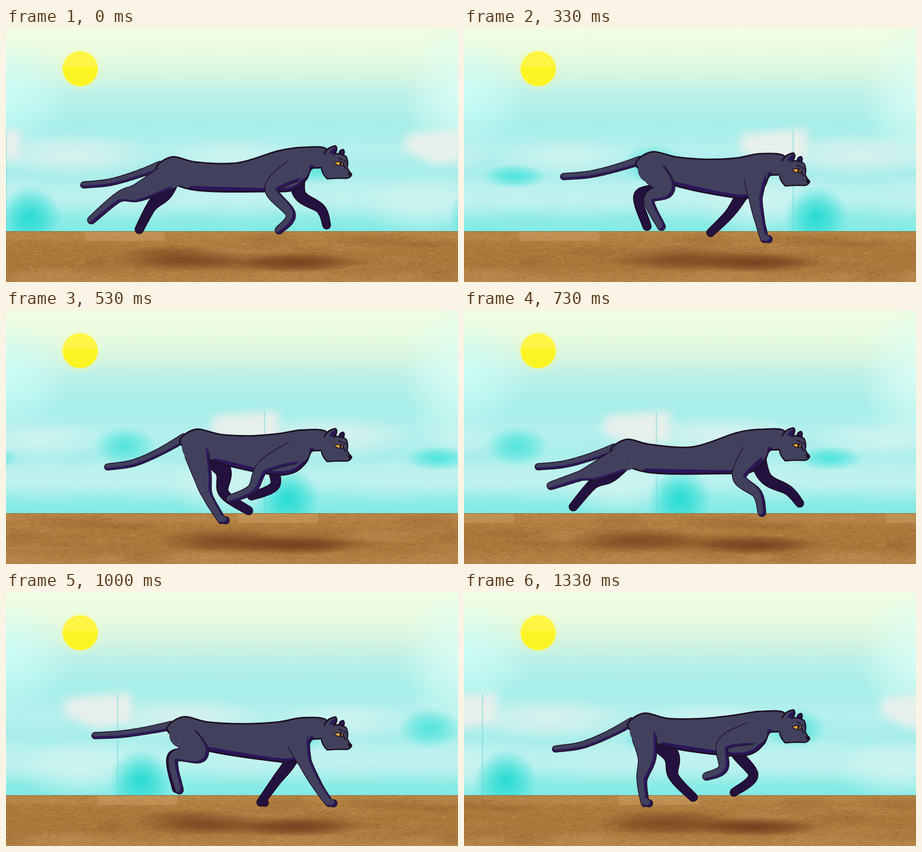
Write an HTML page with a canvas that moves like this. It is 889 by 500 pixels and loops after 1.39 s.

```html
<!DOCTYPE html>
<html lang="en">
<head>
<meta charset="utf-8">
<title>Running panther</title>
<style>
  html, body { margin: 0; width: 100%; height: 100%; overflow: hidden; background: #bdf0ec; }
  canvas { display: block; width: 889px; height: 500px; }
</style>
</head>
<body>
<canvas id="stage" width="889" height="500"></canvas>
<script>
const W = 889, H = 500, HORIZON = 400, LOOP = 1390, FRAMES = 21, STRIDE = 10.5;
const INK = '#1d1022', COAT = '#41415e', SHADE = '#2b1659', FAR = '#23113f';
const ctx = document.getElementById('stage').getContext('2d');

// Key poses of the near side. hind: knee, hock, paw; fore: elbow, wrist, paw.
// The far legs repeat the near ones, late by `lag` behind and early by `lead` in front.
const poses = [
  { at: 0, lag: 0.5, lead: 1.4, rump: [325, 254],
    hind: [262, 323, 222, 333, 168, 378], fore: [522, 316, 560, 367, 537, 398] },
  { at: 0.5, lag: 0.75, lead: 1.5, rump: [318, 255],
    hind: [262, 316, 230, 326, 171, 346], fore: [541, 328, 577, 362, 586, 399] },
  { at: 3, lag: 0, lead: 1.7, rump: [350, 246],
    hind: [367, 328, 307, 314, 297, 366], fore: [604, 338, 655, 357, 710, 368] },
  { at: 4.5, lag: 0.2, lead: 1.5, rump: [347, 246],
    hind: [380, 318, 330, 326, 341, 390], fore: [588, 335, 615, 385, 636, 415] },
  { at: 6, lag: 0.5, lead: 1.6, rump: [410, 240],
    hind: [430, 312, 432, 360, 483, 393], fore: [545, 338, 517, 376, 501, 414] },
  { at: 8, lag: 1.8, lead: 1.6, rump: [372, 235],
    hind: [386, 325, 396, 365, 424, 413], fore: [507, 308, 484, 352, 441, 372] },
  { at: 9.5, lag: 2.4, lead: 0.9, rump: [352, 239],
    hind: [360, 325, 350, 370, 356, 415], fore: [511, 298, 510, 347, 477, 363] }
];
poses.push({ ...poses[0], at: STRIDE });

const mix = (a, b, k) => a + (b - a) * k;
const clamp = (v, lo, hi) => Math.min(hi, Math.max(lo, v));
const wrap = (v, n) => ((v % n) + n) % n;

function poseAt(phase) {
  phase = wrap(phase, STRIDE);
  const i = poses.findIndex(p => p.at > phase);
  const a = poses[i - 1], b = poses[i], k = (phase - a.at) / (b.at - a.at), out = {};
  for (const key in a) {
    out[key] = Array.isArray(a[key])
      ? a[key].map((v, n) => mix(v, b[key][n], k))
      : mix(a[key], b[key], k);
  }
  return out;
}

// Bezier handles of a smooth curve, one [start, c1, c2, end] per span
function spans(pts, closed) {
  const n = pts.length;
  const at = i => pts[closed ? wrap(i, n) : clamp(i, 0, n - 1)];
  const list = [];
  for (let i = 0; i < n - (closed ? 0 : 1); i++) {
    const [a, b, c, d] = [at(i - 1), at(i), at(i + 1), at(i + 2)];
    list.push([b, b.map((v, k) => v + (c[k] - a[k]) / 6), c.map((v, k) => v - (d[k] - b[k]) / 6), c]);
  }
  return list;
}

function curve(pts, closed) {
  const path = new Path2D();
  path.moveTo(...pts[0]);
  for (const [, p, q, end] of spans(pts, closed)) path.bezierCurveTo(...p, ...q, ...end);
  return path;
}

// Discs along a smooth curve; together they form a tapering limb
function discs(pts, radii) {
  const list = [], steps = 18;
  spans(pts).forEach((s, i) => {
    for (let n = 0; n <= steps; n++) {
      const t = n / steps, u = 1 - t;
      const [x, y] = [0, 1].map(k =>
        u * u * u * s[0][k] + 3 * u * u * t * s[1][k] + 3 * u * t * t * s[2][k] + t * t * t * s[3][k]);
      list.push({ x, y, r: mix(radii[i], radii[i + 1], t) });
    }
  });
  return list;
}

function union(list, grow = 0) {
  const path = new Path2D();
  for (const { x, y, r } of list) {
    path.moveTo(x + r + grow, y);
    path.arc(x, y, r + grow, 0, 7);
  }
  return path;
}

function fill(path, color) {
  ctx.fillStyle = color;
  ctx.fill(path);
}

function line(path, color, width) {
  ctx.strokeStyle = color;
  ctx.lineWidth = width;
  ctx.stroke(path);
}

// The limb blends into the body above `free`, its outlined part
function limb(list, color, free, light) {
  const lower = list.slice(Math.floor(list.length * free)), whole = union(list);
  fill(union(lower, 1.6), INK);
  fill(whole, color);
  if (!light) return;
  ctx.save();
  ctx.clip(union(lower));
  fill(whole, SHADE);
  ctx.translate(...light);
  fill(whole, color);
  ctx.restore();
}

function leg(root, joints, radii) {
  const [ax, ay, bx, by, x, y] = joints;
  const list = discs([root, [ax, ay], [bx, by], [x, y]], radii);
  const planted = clamp((y - 402) / 10, 0, 1);
  list.push({ x: x + 8 * planted, y: y + planted, r: 6.5 });
  return list;
}

function shape(d, color, ink) {
  const path = new Path2D(d);
  if (color) fill(path, color);
  if (ink) line(path, INK, ink);
}

function drawHead(dy) {
  ctx.save();
  ctx.translate(0, dy);
  shape('M655 247Q656 240 663 239Q667 242 664 250Z', SHADE, 2.5);
  shape('M612 268L612 248L628 243Q650 244 668 252Q674 262 671 275Q675 283 680 288Q678 295 670 296Q650 295 632 297Q622 288 620 274Z', COAT);
  shape('M648 247Q662 248 669 253Q674 262 671 275Q675 283 680 288Q678 295 670 296Q650 295 632 297Q622 288 620 275', null, 2.5);
  shape('M626 248Q631 235 648 232Q654 238 645 249', COAT, 3);
  shape('M636 247Q640 237 648 235Q651 240 643 248Z', SHADE);
  shape('M645 265Q656 261 663 265L662 271Q653 272 645 265Z', '#e2a52c', 1.6);
  shape('M656 264h4v6h-4Z', INK);
  shape('M655 256L661 259M664 260L669 263M664 268Q665 274 668 277', null, 2);
  shape('M671 284L679 286Q680 291 675 292Z', INK);
  ctx.restore();
}

function drawBody([x, y], dy) {
  const stretched = Math.max(0, 345 - x);
  const back = (y + 237 + dy) / 2 + 11 + stretched * 0.45;
  const pts = [
    [x, y], [x + 50, y + 10], [mix(x, 585, 0.5), back], [535, 242 + dy], [582, 235 + dy * 0.9],
    [630, 238 + dy], [622, 272 + dy], [601, 277 + dy], [590, 299 + dy], [564, 319 + dy],
    [518, 322 + dy * 0.7], [x + 40, y + 64], [x - 29, y + 28]
  ];
  const path = curve(pts, true);
  fill(path, COAT);
  ctx.save();
  ctx.clip(path);
  line(curve(pts.slice(7, 12)), SHADE, 14);
  ctx.restore();
  line(path, INK, 3);
}

function drawTail([x, y], phase) {
  const root = [x - 22, y + 17];
  const tip = [x - 172, 309 - 35 * Math.exp(-(((phase - 3.7) / 1.5) ** 2))];
  const pts = [0, 1, 2, 3].map(i => [
    mix(root[0], tip[0], i / 3),
    mix(root[1], tip[1], Math.sin(i * Math.PI / 6))
  ]);
  limb(discs(pts, [8, 6.5, 6, 5.5]), COAT, 0, [0, -4]);
}

function drawCat(phase) {
  const p = poseAt(phase);
  const dy = clamp(7 + 11 * Math.cos((phase - 4.5) / STRIDE * 2 * Math.PI), 0, 14);
  const hip = [p.rump[0], p.rump[1] + 35], shoulder = [573, 276 + dy];
  const farHind = poseAt(phase - p.lag).hind;
  const farFore = poseAt(phase + p.lead).fore.map((v, i) => i > 3 ? v : v + (i % 2 ? -4 : 14));
  ctx.lineCap = ctx.lineJoin = 'round';
  limb(leg(hip, farHind, [20, 15, 9, 7.5]), FAR, 0);
  limb(leg(shoulder, farFore, [18, 11, 8.5, 7]), FAR, 0);
  drawTail(p.rump, phase);
  drawBody(p.rump, dy);
  limb(leg(hip, p.hind, [26, 17, 9, 7]), COAT, 0.12, [-5, -3]);
  limb(leg(shoulder, p.fore, [24, 12, 8.5, 7]), COAT, 0.08, [-5, -3]);
  drawHead(dy);
}

function layer(height, paint) {
  const c = document.createElement('canvas');
  c.width = W;
  c.height = height;
  paint(c.getContext('2d'));
  return c;
}

function blob(g, x, y, rx, ry, rgb, alpha) {
  g.save();
  g.translate(x, y);
  g.scale(rx, ry);
  const fade = g.createRadialGradient(0, 0, 0, 0, 0, 1);
  fade.addColorStop(0, `rgba(${rgb},${alpha})`);
  fade.addColorStop(0.5, `rgba(${rgb},${alpha * 0.6})`);
  fade.addColorStop(1, `rgba(${rgb},0)`);
  g.fillStyle = fade;
  g.fillRect(-1, -1, 2, 2);
  g.restore();
}

function gradient(g, height, stops) {
  const fade = g.createLinearGradient(0, 0, 0, height);
  stops.forEach(([at, color]) => fade.addColorStop(at, color));
  return fade;
}

const sky = layer(HORIZON, g => {
  g.fillStyle = gradient(g, HORIZON, [[0, '#f1fee3'], [0.12, '#e9fbe1'], [0.24, '#d5f5e0'],
    [0.33, '#bbf0e9'], [0.48, '#a6eee9'], [0.6, '#b5f0ed'], [0.72, '#a8eeeb'], [0.84, '#a9efeb'], [1, '#80eae4']]);
  g.fillRect(0, 0, W, HORIZON);
  blob(g, 0, 130, 130, 110, '205,255,250', 0.8);
  blob(g, W, 130, 110, 150, '222,255,246', 0.8);
  blob(g, 146, 80, 45, 45, '255,250,150', 1);
  for (const [color, from] of [['#fff544', 0], ['#fdf424', 0.1]]) {
    g.fillStyle = color;
    g.beginPath();
    g.arc(146, 80, 34.5, -from, from ? Math.PI + from : 7);
    g.fill();
  }
});

// Drifting clouds, placed relative to the strip's seam at x = 0
const clouds = layer(HORIZON, g => {
  const pale = '212,244,241';
  for (const dx of [-W, 0, W]) {
    g.save();
    g.translate(dx, 0);
    blob(g, 130, 250, 170, 45, '225,242,238', 0.8);
    blob(g, 445, 255, 150, 40, pale, 0.8);
    for (let x = 250; x < W; x += 210) blob(g, x, 332, 190, 48, pale, 0.6);
    blob(g, -75, 350, 120, 62, pale, 0.75);
    blob(g, 615, 268, 62, 40, '35,222,212', 0.65);
    blob(g, 341, 292, 64, 24, '30,222,214', 0.65);
    blob(g, 46, 370, 62, 60, '20,216,208', 0.85);
    g.filter = 'blur(9px)';
    g.fillStyle = 'rgba(234,240,235,.95)';
    g.fill(new Path2D('M-98 208L28 198L27 255L-40 270L-108 240Z'));
    g.filter = 'none';
    g.fillStyle = 'rgba(90,212,210,.35)';
    g.fillRect(-1, 200, 3, 200);
    g.restore();
  }
});

const soil = layer(H - HORIZON, g => {
  let seed = 7;
  const rnd = () => (seed = seed * 16807 % 2147483647) / 2147483647;
  g.fillStyle = gradient(g, 100, [[0, '#b88749'], [0.3, '#ad7a3d'], [0.7, '#aa773b'], [1, '#b68548']]);
  g.fillRect(0, 0, W, 100);
  for (let i = 0; i < 24; i++) {
    blob(g, rnd() * W, rnd() * 100, 60 + rnd() * 90, 6 + rnd() * 10, rnd() < 0.5 ? '140,88,38' : '200,152,92', 0.3);
  }
  for (let i = 0; i < 5000; i++) {
    g.fillStyle = rnd() < 0.5 ? 'rgba(115,72,28,.2)' : 'rgba(218,172,105,.2)';
    g.fillRect(rnd() * W, rnd() * 100, 2 + rnd() * 7, 1);
  }
  g.fillStyle = 'rgba(214,170,112,.35)';
  g.fillRect(0, 1, 157, 18);
});

function scroll(img, x, y) {
  x = Math.round(wrap(x, W));
  ctx.drawImage(img, x, y);
  ctx.drawImage(img, x - W, y);
}

function drawShadow(rumpX) {
  const left = 215 + 1.85 * (rumpX - 325);
  blob(ctx, left + 125, 454, 135, 26, '112,58,26', 0.65);
  blob(ctx, (left + 780) / 2, 460, (700 - left) / 2, 20, '112,58,26', 0.45);
  blob(ctx, 575, 463, 120, 19, '105,52,24', 0.7);
}

function draw(f) {
  const turn = f / FRAMES, phase = f % STRIDE, drag = Math.sin(Math.PI * turn);
  ctx.drawImage(sky, 0, 0);
  scroll(clouds, W * (1 - turn) - 45 * drag, 0);
  scroll(soil, 155 - 4 * W * turn - 130 * drag, HORIZON);
  ctx.fillStyle = 'rgba(110,85,45,.55)';
  ctx.fillRect(0, HORIZON, W, 1);
  drawShadow(poseAt(phase).rump[0]);
  drawCat(phase);
}

const startOf = f => Math.round(f * 20 / 3) * 10;
let shown = -1;

function tick() {
  const t = performance.now() % LOOP;
  let f = FRAMES - 1;
  while (startOf(f) > t) f--;
  if (f !== shown) draw(shown = f);
  requestAnimationFrame(tick);
}
tick();
</script>
</body>
</html>
```
